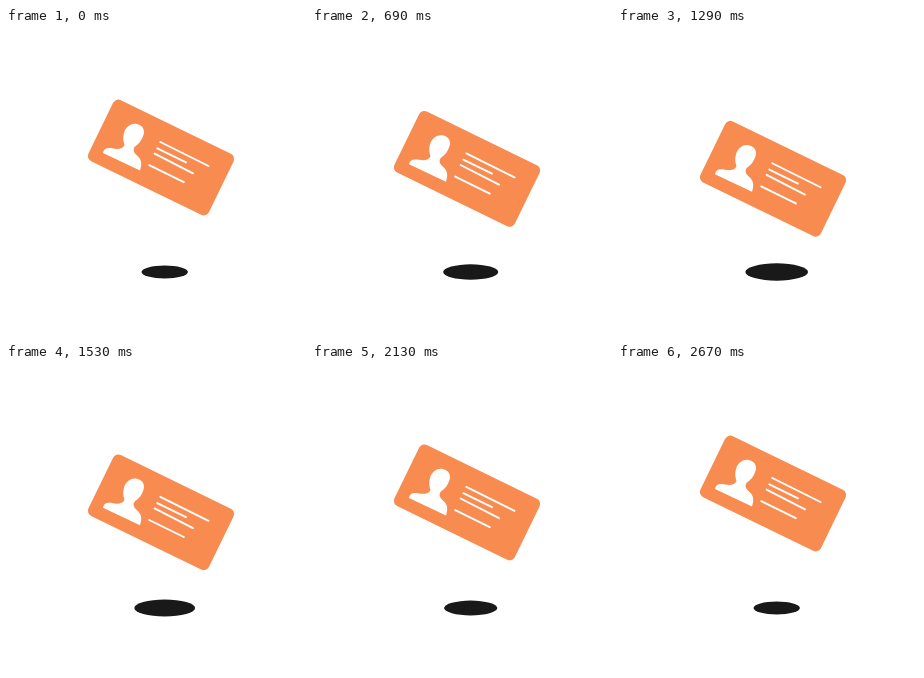
An HTML page for the animation above (2.7 s loop, 300 by 308 pixels).

```html
<!DOCTYPE html>
<html lang="en">
<head>
<meta charset="utf-8">
<title>Floating card</title>
<style>
  html, body { margin: 0; width: 100%; height: 100%; overflow: hidden; background: #fff; }
  svg { display: block; width: 300px; height: 308px; }
</style>
</head>
<body>
<svg viewBox="0 0 300 308">
  <ellipse id="shadow" cx="158.7" cy="244" fill="#191919"/>
  <g id="card">
    <rect x="-67" y="-33.9" width="134" height="67.8" rx="5.8" fill="#f88b50"
          transform="translate(155 129.5) rotate(26)"/>
    <path fill="#fff" d="M97 125C98 120 102 119.5 107 120.5C112 121.5 117 121 118.5 117
      C117.5 114 116.5 110 118 105C120 98.5 125 95 131 96C137 97.5 139 102 137.5 107
      C136 112 133 116 129 118.5C126.5 121 127.5 124.5 131 127.5C135 131 136.5 135 134 142.5Z"/>
    <path fill="none" stroke="#fff" stroke-width="1.9" stroke-linecap="round"
      d="M154.3 114L202.5 138M151.3 120.3L180 134.3M148.6 125.6L187 145.3M143.2 137.2L177.8 154.2"/>
  </g>
</svg>
<script>
  const LOOP = 2700, STEP = 30, LAST = LOOP / STEP - 1;
  const card = document.getElementById('card');
  const shadow = document.getElementById('shadow');
  const start = performance.now();

  function draw(now) {
    const step = Math.floor((Math.max(0, now - start) % LOOP) / STEP);
    // Linear travel down and back up: 0 at both ends, 1 halfway.
    const p = 1 - Math.abs(2 * step / LAST - 1);
    card.setAttribute('transform', `translate(0 ${(22 * p).toFixed(3)})`);
    shadow.setAttribute('rx', 23.2 + 8.4 * p);
    shadow.setAttribute('ry', 6.5 + 2.2 * p);
    requestAnimationFrame(draw);
  }
  draw(start);
</script>
</body>
</html>
```
